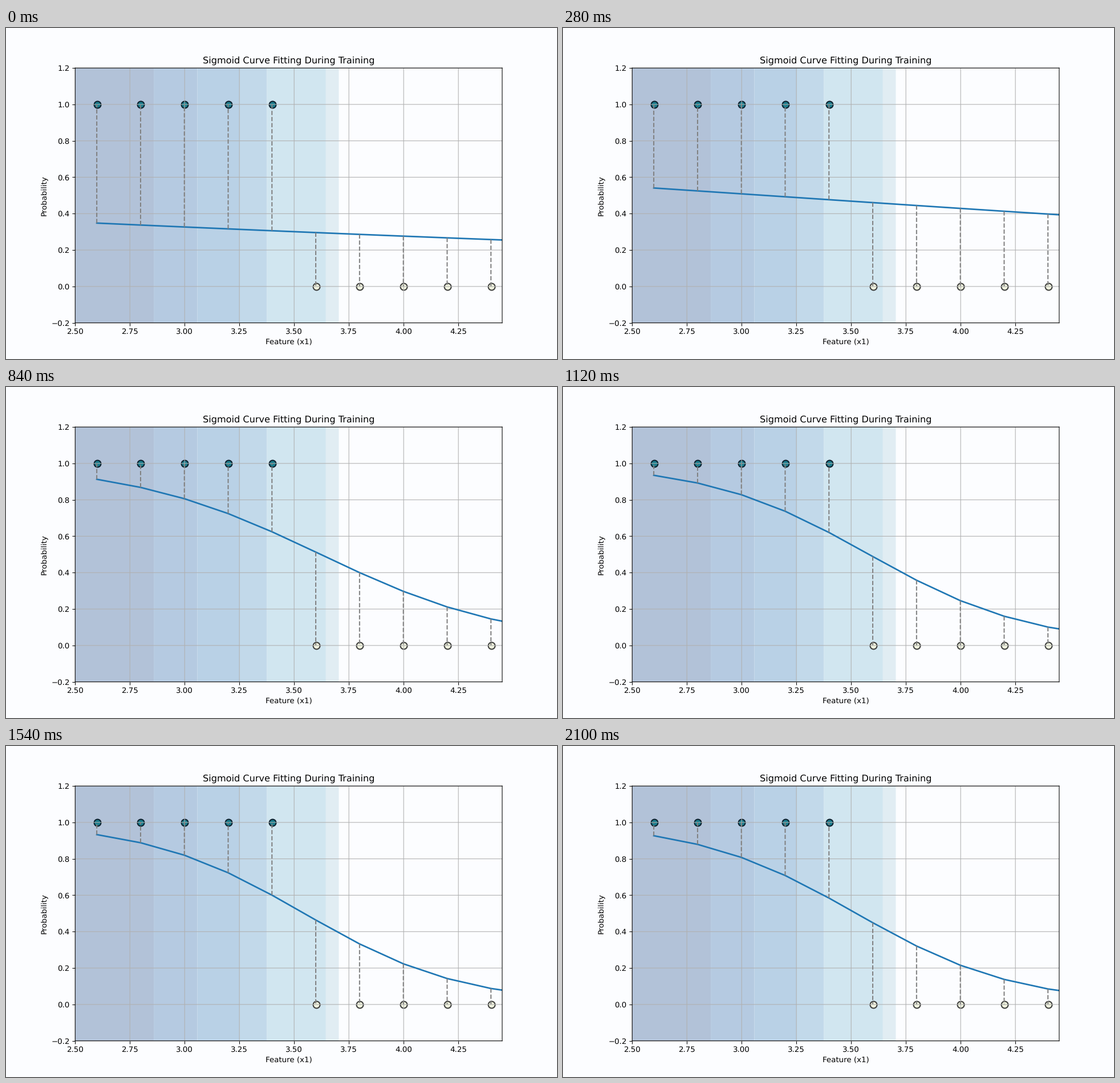
These frames come from a looping animation (966 px wide and 580 px high, 2240 ms). A matplotlib script:

```python
import numpy as np
import matplotlib.pyplot as plt
from matplotlib.animation import FuncAnimation
from matplotlib.transforms import ScaledTranslation

W, H, DPI = 966, 580, 96.6
FRAMES, STEP = 16, 140
HALF = 0.5
BG = "#fcfdff"

plt.rcParams.update({"font.family": "DejaVu Sans", "path.snap": False,
                     "text.hinting": "no_hinting"})

# Training checkpoints: frame, slope and logit at the class boundary
CENTER = 3.5
KEYS = np.array([0, 2, 4, 6, 8, 11, 15], float)
SLOPE = np.array([-0.24, -0.322, -1.413, -2.284, -2.690, -2.762, -2.729])
LOGIT = np.array([-0.850, -0.132, 0.329, 0.274, 0.217, 0.125, 0.062])


def smooth(t, values):
    """Cubic Hermite interpolation through the checkpoints."""
    m = np.gradient(values, KEYS)
    k = min(np.searchsorted(KEYS, t, side="right") - 1, len(KEYS) - 2)
    h = KEYS[k + 1] - KEYS[k]
    u = (t - KEYS[k]) / h
    return ((2 * u**3 - 3 * u**2 + 1) * values[k]
            + (u**3 - 2 * u**2 + u) * h * m[k]
            + (3 * u**2 - 2 * u**3) * values[k + 1]
            + (u**3 - u**2) * h * m[k + 1])


def sigmoid(x, t):
    z = smooth(t, LOGIT) + smooth(t, SLOPE) * (x - CENTER)
    return 1 / (1 + np.exp(-z))


# The tiny margin guards against the pixel size being rounded down
fig, ax = plt.subplots(figsize=((W + 0.001) / DPI, (H + 0.001) / DPI), dpi=DPI,
                       facecolor=BG)
# The frame and grid sit half a pixel right of and below the data lines
dx, dy = HALF / W, HALF / H
fig.subplots_adjust(left=0.125 + dx, right=0.9 + dx,
                    bottom=0.11 - dy, top=0.88 - dy)
data_shift = ax.transData + ScaledTranslation(-HALF / DPI, HALF / DPI,
                                              fig.dpi_scale_trans)

ax.set_facecolor(BG)
ax.set(xlim=(2.5, 4.45), ylim=(-0.2, 1.2), xlabel="Feature (x1)",
       ylabel="Probability", title="Sigmoid Curve Fitting During Training")
ax.set_xticks(np.arange(2.5, 4.3, 0.25))
ax.grid(True)

edges = [2.5, 2.859, 3.058, 3.25, 3.376, 3.645, 3.704]
shades = ["#b2c2d8", "#b5cae1", "#b9d1e6", "#c2d9ea", "#d1e6f0", "#e1edf3"]
for left, right, shade in zip(edges, edges[1:], shades):
    ax.axvspan(left, right, color=shade, lw=0, zorder=0.5, snap=True)

xs = 2.6 + 0.2 * np.arange(11)
pts = xs[:10]
labels = (pts < CENTER).astype(float)
for value, fill, edge in ((1, "#1a7d8d", "#0b1e2b"), (0, "#f0f3de", "#3c3d3b")):
    sel = pts[labels == value]
    ax.scatter(sel, np.full(len(sel), value), s=80, c=fill, edgecolors=edge,
               linewidths=1.5, zorder=1)

curve, = ax.plot([], [], color="#1f77b4", lw=2, transform=data_shift)
errors = ax.vlines(pts, 0, labels, colors="gray", linestyles="dashed", lw=1.5)
errors.set_transform(data_shift)
ax.set(xlim=(2.5, 4.45), ylim=(-0.2, 1.2))


def update(i):
    p = sigmoid(xs, i)
    curve.set_data(xs, p)
    errors.set_segments([[(x, a), (x, b)] for x, a, b in zip(pts, p, labels)])
    return curve, errors


anim = FuncAnimation(fig, update, frames=FRAMES, interval=STEP, repeat=True,
                     repeat_delay=0)
plt.show()
```
